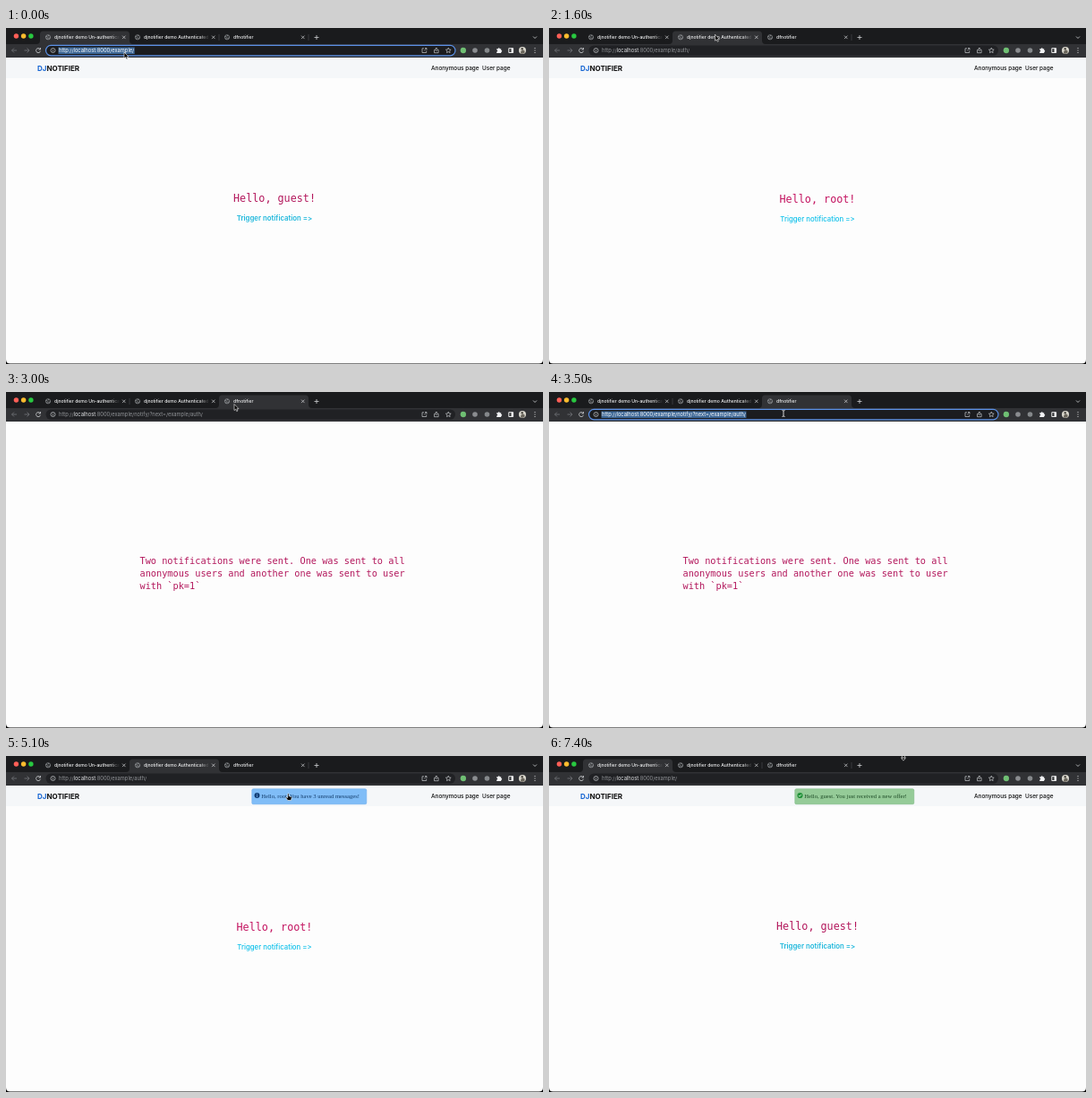
Animation, 600 px wide and 375 px high, one loop 7.5 s. Source, as an HTML page:

```html
<!DOCTYPE html>
<html lang="en">
<head>
<meta charset="utf-8">
<title>djnotifier demo</title>
<style>
html, body { margin: 0; width: 100%; height: 100%; overflow: hidden; background: #000; }
svg { display: block; width: 600px; height: 375px; font-family: Inter, sans-serif; font-variant-ligatures: none; font-feature-settings: "calt" 0; }
.icon { fill: none; stroke: #c8cacd; stroke-width: .85; }
.mono { font-family: "DejaVu Sans Mono", monospace; fill: #b3175c; white-space: pre; }
.serif { font: 6.6px "Liberation Serif", serif; }
.link { font-size: 6.4px; font-weight: 500; fill: #0c0c0c; }
</style>
</head>
<body>
<svg viewBox="0 0 600 375">
  <defs>
    <linearGradient id="fade" gradientUnits="userSpaceOnUse" x1="78" x2="89">
      <stop stop-color="#f2f3f4"/><stop offset="1" stop-color="#f2f3f4" stop-opacity="0"/>
    </linearGradient>
  </defs>
  <path d="M0 33H600V370Q600 374.500 595.500 374.500H4.500Q0 374.500 0 370Z" fill="#fdfdfd"/>
  <path d="M0 0H600V18H0Z" fill="#1a1b1d"/>
  <circle cx="11.400" cy="9" r="2.700" fill="#ff5f57"/>
  <circle cx="19.600" cy="9" r="2.700" fill="#febc2e"/>
  <circle cx="27.900" cy="9" r="2.700" fill="#28c840"/>
  <g id="tabs"></g>
  <path class="icon" d="M344.500 10.500h5m-2.500-2.500v5M589 9.500l2 2 2-2"/>

  <path d="M0 18H600V33H0Z" fill="#313235"/>
  <path class="icon" d="M12 25H6.500m2.500-2.500L6.500 25 9 27.500M20.500 25H26m-2.500-2.500L26 25l-2.500 2.500" style="stroke:#717276"/>
  <path class="icon" d="M38 23.500A2.500 2.500 0 1 0 38.500 25.700M38.500 22v2h-2"/>
  <rect id="bar" x="44.500" y="19.400" width="457.500" height="11.400" rx="5.700" stroke-width="1.200"/>
  <g class="icon" style="stroke-width:.7">
    <circle cx="52.500" cy="25" r="2.500"/><path d="M52.500 24.700v1.700m0-2.900v.6"/>
    <path d="M467 22.800h-2v4.700h4.700v-2M468 22.500h2v2m0-2l-2.700 2.700"/>
    <path d="M479.800 24.500h-1.300v3.200h4.600v-3.200h-1.300M480.800 26v-4m-1.500 1.500l1.500-1.500 1.500 1.500"/>
    <path d="M494.300 22.100l.9 1.900 2 .2-1.500 1.400.4 2-1.800-1-1.800 1 .4-2-1.500-1.400 2-.2z"/>
  </g>
  <rect id="selection" x="58.500" y="21.500" height="7.500" fill="#3d6796"/>
  <text id="url" x="59" y="27.200" font-size="5.750"><tspan></tspan><tspan></tspan><tspan></tspan></text>
  <circle cx="510.800" cy="25" r="3.200" fill="#6fbf73"/>
  <circle cx="524" cy="25" r="2.800" fill="#8b8d90"/>
  <circle cx="537.500" cy="25" r="2.800" fill="#85888b"/>
  <path d="M548.200 23.200h1.500a1 1 0 0 1 2 0h1.500v1.500a1 1 0 0 1 0 2v1.400h-5v-1.500a1 1 0 0 0 0-2z" fill="#f1f2f3"/>
  <path d="M561.800 22.700h4.800v4.800h-4.800z" fill="none" stroke="#eee"/><path d="M564.500 22.700h2v4.800h-2z" fill="#eee"/>
  <circle cx="577" cy="25" r="4" fill="#d9d6cc"/><path d="M575 28.500q0-4 2.500-4t2 3.300q-2 1.700-4.500.7z" fill="#6a665c"/><circle cx="576.700" cy="23.300" r="1.200" fill="#4b4841"/>
  <path d="M590.500 22h1v1h-1zm0 2.500h1v1h-1zm0 2.500h1v1h-1z" fill="#d5d6d8"/>

  <g id="site">
    <path d="M0 33H600V56H0Z" fill="#f5f7f9"/>
    <text x="35" y="47.500" font-size="8" font-weight="700" fill="#111"><tspan fill="#1464d2">DJ</tspan>NOTIFIER</text>
    <text class="link" x="475" y="47">Anonymous page</text>
    <text class="link" x="532" y="47">User page</text>
    <text id="hello" class="mono" x="300" font-size="11.750" text-anchor="middle"></text>
    <text id="trigger" x="300" font-size="7.800" text-anchor="middle">Trigger notification =&gt;</text>
  </g>
  <g id="report" class="mono" font-size="10.250">
    <text x="149.500" y="192">Two notifications were sent. One was sent to all</text>
    <text x="149.500" y="206">anonymous users and another one was sent to user</text>
    <text x="149.500" y="220">with `pk=1`</text>
  </g>
  <g id="info">
    <rect x="274.800" y="36.700" width="128" height="17" rx="1.500" fill="#80bdf7" stroke="#6caeec" stroke-width=".6"/>
    <circle cx="280.500" cy="44" r="3" fill="#123f78"/><path d="M280.500 43.700v2m0-3.400v.7" stroke="#80bdf7" stroke-width=".8"/>
    <text class="serif" x="285.300" y="47" fill="#123c6b">Hello, root. You have 3 unread messages!</text>
  </g>
  <g id="offer">
    <rect x="274.800" y="36.700" width="133" height="17" rx="1.500" fill="#95cb98" stroke="#7fb983" stroke-width=".6"/>
    <circle cx="280.500" cy="44" r="3.100" fill="#23923a"/><path d="M279 44l1.100 1.200 2-2.300" fill="none" stroke="#d8f0d9" stroke-width=".8"/>
    <text class="serif" x="285.300" y="47" fill="#1d4a25">Hello, guest. You just received a new offer!</text>
  </g>

  <g id="cursor" stroke="#fff" stroke-width=".6">
    <path id="arrow" d="M0 0V7L1.600 5.600 2.700 8 3.900 7.500 2.800 5.200H5Z" fill="#000"/>
    <path id="beam" d="M-1.500-3.500Q0-3.500 0-2.500Q0-3.500 1.500-3.500M0-2.500V2.500M-1.500 3.500Q0 3.500 0 2.500Q0 3.500 1.500 3.500" fill="none" stroke="#e8e8e8" stroke-width=".9"/>
    <path id="hand" d="M-.8-3.200q.8-.8 1.500 0V-.7l2.500.7q.6.300.4 1.200L3 4H-.6L-2.700 1.200q0-1 1-.7l.9.700z" fill="#000"/>
    <path id="resize" d="M0-3.200L2.300-.6H.7V.6H2.300L0 3.200-2.300.6H-.7V-.6H-2.300Z" fill="#000"/>
  </g>
</svg>
<script>
const LOOP = 7500;
const $ = id => document.getElementById(id);
const show = (id, on) => $(id).style.display = on ? '' : 'none';
const setAll = (node, attrs) => {
  for (const key in attrs) node.setAttribute(key, attrs[key]);
};
const titles = ['djnotifier demo Un-authenticated', 'djnotifier demo Authenticated', 'dfnotifier'];
const paths = ['/example/', '/example/auth/', '/example/notify/?next=/example/auth/'];

// [time, active tab]
const switches = [[0, 0], [1200, 1], [2700, 2], [4500, 1], [6000, 0]];
// [from, to] while the address is selected
const focused = [[0, 100], [3400, 3900]];
// [time, x, y] of the pointer
const moves = [
  [0, 132, 27], [300, 132, 27], [950, 183, 6], [1500, 183, 7], [2400, 254, 12], [2900, 254, 12],
  [3350, 262, 24], [3900, 262, 24], [4400, 190, 9], [4600, 190, 9], [5050, 315.5, 45.5],
  [5400, 315.5, 45.5], [5950, 109, 9], [6400, 109, 9], [7300, 396, 2], [7500, 396, 2]
];

$('tabs').innerHTML = titles.map((title, i) => `
  <g transform="translate(${38 + 100 * i})">
    <path class="shape" d="M-4 18Q0 18 0 14V7Q0 3.500 3.500 3.500H96.500Q100 3.500 100 7V14Q100 18 104 18Z" fill="#313235"/>
    <path class="line" d="M100 7V14" stroke="#505155" stroke-width=".6"/>
    <g class="icon" style="stroke-width:.6;stroke:#aeb0b4">
      <circle cx="9" cy="10.300" r="2.600"/><path d="M6.500 9.500q2.500 0 2.500 1.300t2.500 0M8 12.500V11M9.500 8v1.300"/>
      <path d="M92 8.600l3.500 3.500m0-3.500l-3.500 3.500" style="stroke:#d5d6d8;stroke-width:.7"/>
    </g>
    <text x="16" y="12.200" font-size="5.100" font-weight="500" fill="url(#fade)">${title}</text>
  </g>`).join('');
const shapes = document.querySelectorAll('.shape');
const lines = document.querySelectorAll('.line');
const urlParts = $('url').children;
document.querySelectorAll('#tabs text').forEach(label => label.style.clipPath = 'none');

function pointerAt(t) {
  const i = moves.findIndex(m => m[0] > t);
  const [t0, x0, y0] = moves[i - 1], [t1, x1, y1] = moves[i];
  const p = (t - t0) / (t1 - t0), e = p * p * (3 - 2 * p);
  return [x0 + (x1 - x0) * e, y0 + (y1 - y0) * e];
}

function drawBrowser(active, editing) {
  shapes.forEach((shape, i) => shape.style.display = i === active ? '' : 'none');
  lines.forEach((line, i) => line.style.display = i === active || i + 1 === active ? 'none' : '');
  setAll($('bar'), { fill: editing ? '#1b1c1f' : '#202124', stroke: editing ? '#5b91e8' : 'none' });
  ['http://', 'localhost', ':8000' + paths[active]].forEach((text, i) => {
    urlParts[i].textContent = text;
    urlParts[i].setAttribute('fill', editing ? '#fff' : i === 1 ? '#e4e6e9' : '#929599');
  });
  show('selection', editing);
  if (editing) $('selection').setAttribute('width', $('url').getComputedTextLength() + 1);
}

function drawPage(active, t) {
  const guest = active === 0;
  show('site', active < 2);
  show('report', active === 2);
  show('info', active === 1 && t >= 4500);
  show('offer', guest && t >= 6000);
  $('hello').textContent = guest ? 'Hello, guest!' : 'Hello, root!';
  $('hello').style.fill = guest ? '#b3175c' : '#c3125f';
  $('hello').setAttribute('y', guest ? 194 : 194.7);
  setAll($('trigger'), guest
    ? { y: 214.5, fill: '#20b8dc', 'font-weight': 600 }
    : { y: 216.2, fill: '#0fc0ea', 'font-weight': 500 });
}

function drawPointer(x, y, active, t) {
  const kind = y < 3.5 ? 'resize'
    : active === 2 && y > 18 && y < 32 ? 'beam'
    : active === 1 && t > 4500 && x > 274 && y > 36 ? 'hand' : 'arrow';
  for (const name of ['arrow', 'beam', 'hand', 'resize']) show(name, name === kind);
  $('cursor').setAttribute('transform', `translate(${x} ${y})`);
}

function render(now) {
  const t = now % LOOP;
  const active = switches.filter(s => s[0] <= t).pop()[1];
  const [x, y] = pointerAt(t);
  drawBrowser(active, focused.some(([from, to]) => t >= from && t < to));
  drawPage(active, t);
  drawPointer(x, y, active, t);
}

const start = performance.now();
(function tick() {
  render(performance.now() - start);
  requestAnimationFrame(tick);
})();
</script>
</body>
</html>
```
